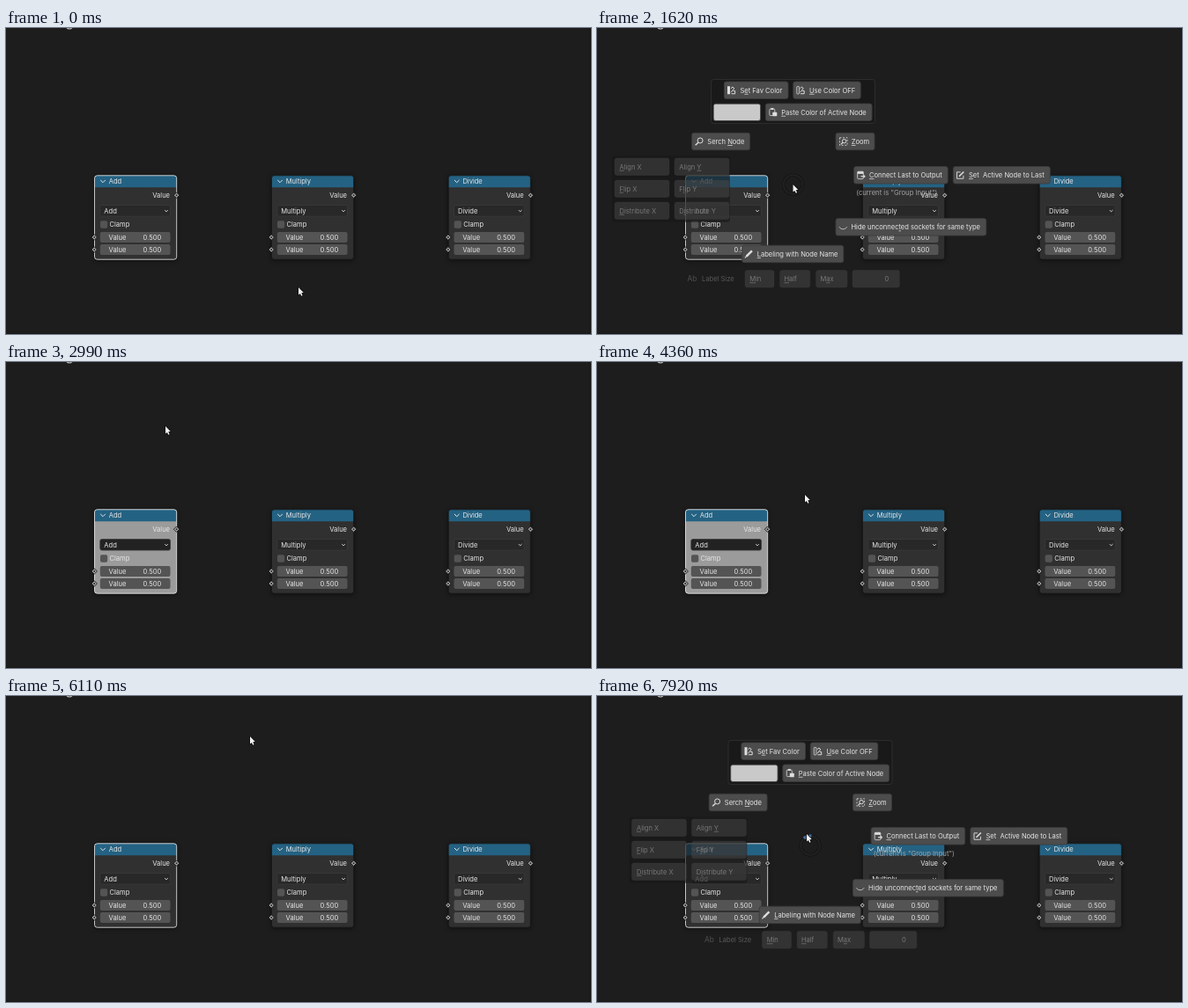
These frames come from a looping animation (664x348 px, 7990 ms). An HTML page with a canvas:

```html
<!DOCTYPE html>
<html lang="en">
<head>
<meta charset="utf-8">
<title>Node pie menu</title>
<style>
html, body { margin: 0; width: 100%; height: 100%; overflow: hidden; background: #1d1d1d; }
canvas { display: block; width: 664px; height: 348px; }
</style>
</head>
<body>
<canvas id="stage"></canvas>
<script>
const W = 664, H = 348, LOOP = 7990;
const canvas = document.getElementById('stage');
const ctx = canvas.getContext('2d');
const dpr = window.devicePixelRatio || 1;
canvas.width = W * dpr;
canvas.height = H * dpr;

// Pointer tip: time, x, y
const PATH = [
  [0, 332, 295], [50, 332, 295], [180, 328, 297], [590, 108, 190], [740, 115, 177],
  [890, 151, 183], [960, 151, 183], [1150, 203, 179], [1290, 203, 179], [1480, 222.5, 178],
  [2160, 222.5, 178], [2720, 181, 73], [3080, 181, 73], [3820, 236, 217],
  [4030, 236, 217], [4360, 236, 151], [5030, 236, 151], [5640, 277, 46],
  [6250, 277, 46], [6980, 243, 169], [7330, 243, 169], [7650, 241, 169],
  [7900, 241, 169], [7920, 238, 157], [LOOP, 238, 157]
];
// Open time, close time, centre
const MENUS = [
  { from: 1480, to: 2920, x: 222.5, y: 178 },
  { from: 4690, to: 6020, x: 236, y: 151.5 },
  { from: 7430, to: LOOP, x: 242, y: 170 }
];
const COLOR_ON = [2920, 6020];

function pointer(t) {
  let i = 1;
  while (i < PATH.length - 1 && PATH[i][0] < t) i++;
  const [t0, x0, y0] = PATH[i - 1], [t1, x1, y1] = PATH[i];
  const u = Math.min(1, Math.max(0, (t - t0) / (t1 - t0)));
  const e = u * u * (3 - 2 * u);
  return { x: x0 + (x1 - x0) * e, y: y0 + (y1 - y0) * e };
}

function box(x, y, w, h, r, fill, stroke) {
  ctx.beginPath();
  ctx.roundRect(x, y, w, h, r);
  if (fill) { ctx.fillStyle = fill; ctx.fill(); }
  if (stroke) { ctx.strokeStyle = stroke; ctx.lineWidth = 0.8; ctx.stroke(); }
}

function line(pts, color, width = 1, close = false) {
  ctx.beginPath();
  pts.forEach(([x, y], i) => i ? ctx.lineTo(x, y) : ctx.moveTo(x, y));
  if (close) ctx.closePath();
  ctx.strokeStyle = color;
  ctx.lineWidth = width;
  ctx.stroke();
}

function circle(x, y, r, color, width = 1) {
  ctx.beginPath();
  ctx.arc(x, y, r, 0, Math.PI * 2);
  ctx.strokeStyle = color;
  ctx.lineWidth = width;
  ctx.stroke();
}

function text(s, x, cy, color = '#e6e6e6', align = 'left', size = 7.55) {
  ctx.font = size + 'px Inter, "Open Sans", sans-serif';
  ctx.textAlign = align;
  ctx.fillStyle = color;
  ctx.fillText(s, x, cy + 2.75);
}

// Label with one underlined shortcut letter
function label(s, x, cy, key, color) {
  text(s, x, cy, color);
  if (key < 0) return;
  const a = ctx.measureText(s.slice(0, key)).width;
  const w = ctx.measureText(s[key]).width;
  ctx.fillRect(x + a, cy + 4.1, w, 0.7);
}

function chevron(x, y, s, color) {
  line([[x - s, y - s / 2], [x, y + s / 2], [x + s, y - s / 2]], color, 1);
}

function socket(x, y) {
  ctx.save();
  ctx.translate(x, y);
  ctx.rotate(Math.PI / 4);
  ctx.fillStyle = '#a6a6a6';
  ctx.fillRect(-2.3, -2.3, 4.6, 4.6);
  ctx.strokeStyle = '#111';
  ctx.lineWidth = 0.8;
  ctx.strokeRect(-2.3, -2.3, 4.6, 4.6);
  ctx.restore();
  ctx.fillStyle = '#222';
  ctx.beginPath();
  ctx.arc(x, y, 1, 0, 7);
  ctx.fill();
}

function node(dx, name, selected, pale) {
  ctx.save();
  ctx.translate(dx, 0);
  ctx.shadowColor = 'rgba(0,0,0,.55)';
  ctx.shadowBlur = 5 * dpr;
  ctx.shadowOffsetY = 1 * dpr;
  box(100.5, 167.8, 93.2, 95.4, 3, pale ? '#9b9b9b' : '#303030');
  ctx.shadowColor = 'transparent';
  box(100.5, 167.8, 93.2, 13.4, [3, 3, 0, 0], '#246283');
  box(100.5, 167.8, 93.2, 95.4, 3, null, selected ? '#f0f0f0' : '#161616');
  chevron(110, 174.3, 2.8, '#e6e6e6');
  text(name, 116.7, 174.3);
  text('Value', 186, 190.3, '#e6e6e6', 'right');
  box(106.8, 201.5, 79.7, 12.6, 2, pale ? '#222222' : '#282828', '#3a3a3a');
  text(name, 111.3, 207.8);
  chevron(182, 208, 1.8, '#cfcfcf');
  box(107, 219.3, 8.2, 8.4, 1.8, '#545454');
  text('Clamp', 117.5, 223.6);
  for (const y of [238, 252]) {
    box(106.8, y - 6.1, 79.7, 12.2, 2, '#545454');
    text('Value', 116.6, y);
    text('0.500', 176.2, y, '#e6e6e6', 'right');
    socket(100.2, y);
  }
  socket(193.6, 190.2);
  ctx.restore();
}

const INK = '#dedede';
const swatches = (x, y) => {
  ctx.fillStyle = INK;
  ctx.fillRect(x - 4.5, y - 4.5, 3, 9);
  line([[x - 0.5, y - 2], [x + 1.5, y - 3.8], [x + 3.2, y - 1.8], [x - 0.5, y + 2.5]], INK);
  line([[x, y + 4], [x + 4.2, y + 4], [x + 4.2, y + 0.8], [x + 2.2, y + 0.8]], INK);
};
const ICONS = {
  fav: swatches,
  use(x, y) {
    box(x - 4.2, y - 4.2, 2.6, 8.4, 0.5, null, INK);
    line([[x - 0.5, y - 2], [x + 1.5, y - 3.8], [x + 3.2, y - 1.8], [x - 0.5, y + 2.5]], INK);
    line([[x, y + 4], [x + 4.2, y + 4], [x + 4.2, y + 0.8], [x + 2.2, y + 0.8]], INK);
  },
  paste(x, y) {
    box(x - 4, y - 3.6, 6, 7.4, 1, null, INK);
    ctx.fillStyle = INK;
    ctx.fillRect(x - 2.5, y - 4.8, 3, 2);
    box(x - 0.5, y, 5, 4.6, 0.8, INK);
  },
  search(x, y) {
    circle(x + 1.1, y - 1.1, 3, INK);
    line([[x - 1.1, y + 1.1], [x - 4.3, y + 4.3]], INK, 1.4);
  },
  zoom(x, y) {
    ctx.setLineDash([2, 1.6]);
    box(x - 4.3, y - 4.3, 8.6, 8.6, 0, null, INK);
    ctx.setLineDash([]);
    circle(x + 0.8, y - 0.4, 2.2, INK);
    line([[x - 0.8, y + 1.2], [x - 3, y + 3.4]], INK, 1.2);
  },
  output(x, y) {
    box(x - 3.8, y - 4, 6.6, 8.4, 1, null, INK);
    ctx.fillStyle = INK;
    ctx.fillRect(x - 3.8, y - 4, 6.6, 2.6);
    line([[x, y + 1.5], [x + 4.6, y + 1.5]], INK, 1.2);
    line([[x + 3, y - 0.2], [x + 4.8, y + 1.5], [x + 3, y + 3.2]], INK);
  },
  edit(x, y) {
    line([[x, y - 3.4], [x - 4, y - 3.4], [x - 4, y + 4], [x + 3.4, y + 4], [x + 3.4, y + 0.5]], INK, 0.9);
    line([[x - 1.5, y + 1.5], [x + 3.8, y - 3.8]], INK, 1.6);
  },
  eye(x, y) {
    ctx.beginPath();
    ctx.arc(x, y - 2.6, 5, 0.5, Math.PI - 0.5);
    ctx.strokeStyle = '#bdbdbd';
    ctx.lineWidth = 1;
    ctx.stroke();
  },
  pencil(x, y) {
    line([[x - 2.6, y + 2.6], [x + 3.6, y - 3.6]], INK, 2.4);
    line([[x - 4.4, y + 4.4], [x - 2, y + 2]], INK, 1.2);
  }
};

// Laid out for a menu centred at 222.5, 178: x, y, width, icon, icon x, text x, label, key
const BUTTONS = [
  [144.3, 61, 72.7, 'fav', 152.5, 162.5, 'Set Fav Color', 1],
  [222.7, 61, 76.6, 'use', 231, 241, 'Use Color OFF', 0],
  [191.3, 86, 120.8, 'paste', 199.8, 209.3, 'Paste Color of Active Node', 0],
  [107.6, 119.3, 66, 'search', 116, 125.3, 'Serch Node', 6],
  [271, 119.3, 44, 'zoom', 279.8, 288.8, 'Zoom', 0],
  [291.6, 157.5, 106.6, 'output', 299.5, 309, 'Connect Last to Output', 0],
  [404.3, 157.5, 110, 'edit', 412.5, 422, 'Set  Active Node to Last', 0],
  [271, 216.6, 170.8, 'eye', 279.3, 288.5, 'Hide unconnected sockets for same type', 13],
  [164.6, 247.2, 115.2, 'pencil', 172.3, 181.7, 'Labeling with Node Name', 0]
];
const BH = 19.5;
const PANEL = 'rgba(24,24,24,.62)', EDGE = 'rgba(66,66,66,.6)';

function faded(x, y, w, tx, s, key) {
  box(x, y, w, BH, 2.5, 'rgba(74,74,74,.5)', 'rgba(61,61,61,.4)');
  label(s, tx, y + BH / 2, key, 'rgba(205,205,205,.45)');
}

function ring(cx, cy, p) {
  const dx = p.x - cx, dy = p.y - cy;
  circle(cx, cy, 10.8, '#151515', 3.6);
  circle(cx, cy, 10.8, '#212121', 2);
  if (Math.hypot(dx, dy) < 13) return;
  const a = Math.atan2(dy, dx);
  ctx.beginPath();
  ctx.arc(cx, cy, 10.8, a - 0.42, a + 0.42);
  ctx.strokeStyle = '#48719f';
  ctx.lineWidth = 3.6;
  ctx.stroke();
}

function menu(m, p) {
  const ox = m.x - 222.5, oy = m.y - 178;
  const px = p.x - ox, py = p.y - oy;
  ctx.save();
  ctx.translate(ox, oy);
  ring(222.5, 178, { x: px, y: py });

  box(17, 145.3, 133.8, 75.4, 3, PANEL);
  ['Align', 'Flip', 'Distribute'].forEach((s, i) => {
    const y = 148 + 25 * i;
    faded(20, y, 62, 25.5, s + ' X', 0);
    faded(88, y, 62, 93.3, s + ' Y', i ? 1 : 6);
  });

  box(129.5, 58.5, 186, 50, 3, PANEL, EDGE);
  box(132.2, 86.2, 53.4, 19.3, 2.5, '#c9c9c9', '#3d3d3d');

  text('(current is "Group Input")', 294.2, 187.7, '#a0a0a0', 'left', 7.7);

  for (const [x, y, w, icon, ix, tx, s, key] of BUTTONS) {
    const hot = px >= x && px <= x + w && py >= y && py <= y + BH;
    box(x, y, w, BH, 2.5, hot ? '#656565' : '#4c4c4c', '#3a3a3a');
    ICONS[icon](ix, y + BH / 2);
    label(s, tx, y + BH / 2, key, '#e6e6e6');
  }

  const ry = 275.6, rc = ry + BH / 2;
  text('Ab', 102.5, rc, '#4f4f4f', 'left', 8.4);
  text('Label Size', 119, rc, '#585858');
  faded(168, ry, 33, 173.2, 'Min', 0);
  faded(207.6, ry, 34.2, 212.4, 'Half', 0);
  faded(248.6, ry, 35.4, 253.4, 'Max', 1);
  faded(290, ry, 53.4, 326.4, '0', -1);
  ctx.restore();
}

function arrow(p) {
  ctx.save();
  ctx.translate(p.x, p.y);
  ctx.beginPath();
  [[0, 0], [0, 8.6], [1.9, 6.9], [3.2, 9.8], [4.6, 9.2], [3.3, 6.3], [5.8, 6.1]]
    .forEach(([x, y]) => ctx.lineTo(x, y));
  ctx.closePath();
  ctx.lineJoin = 'round';
  ctx.strokeStyle = '#0c0c0c';
  ctx.lineWidth = 1.4;
  ctx.stroke();
  ctx.fillStyle = '#f4f4f4';
  ctx.fill();
  ctx.restore();
}

function backdrop() {
  ctx.fillStyle = '#1d1d1d';
  ctx.fillRect(0, 0, W, H);
  ctx.fillStyle = '#171717';
  ctx.fillRect(0, H - 1, W, 1);
  ctx.fillRect(W - 1.5, 0, 1.5, H);
  // Tail of a letter cut off by the top edge
  ctx.beginPath();
  ctx.arc(72, -3, 4, 0.5, Math.PI - 0.5);
  ctx.strokeStyle = '#c8c8c8';
  ctx.lineWidth = 1.2;
  ctx.stroke();
}

function draw(t) {
  ctx.setTransform(dpr, 0, 0, dpr, 0, 0);
  const p = pointer(t);
  backdrop();
  node(0, 'Add', true, t >= COLOR_ON[0] && t < COLOR_ON[1]);
  node(201, 'Multiply', false, false);
  node(401.7, 'Divide', false, false);
  const open = MENUS.find(m => t >= m.from && t < m.to);
  if (open) menu(open, p);
  arrow(p);
}

const start = performance.now();
function tick() {
  draw((performance.now() - start) % LOOP);
  requestAnimationFrame(tick);
}
tick();
</script>
</body>
</html>
```
